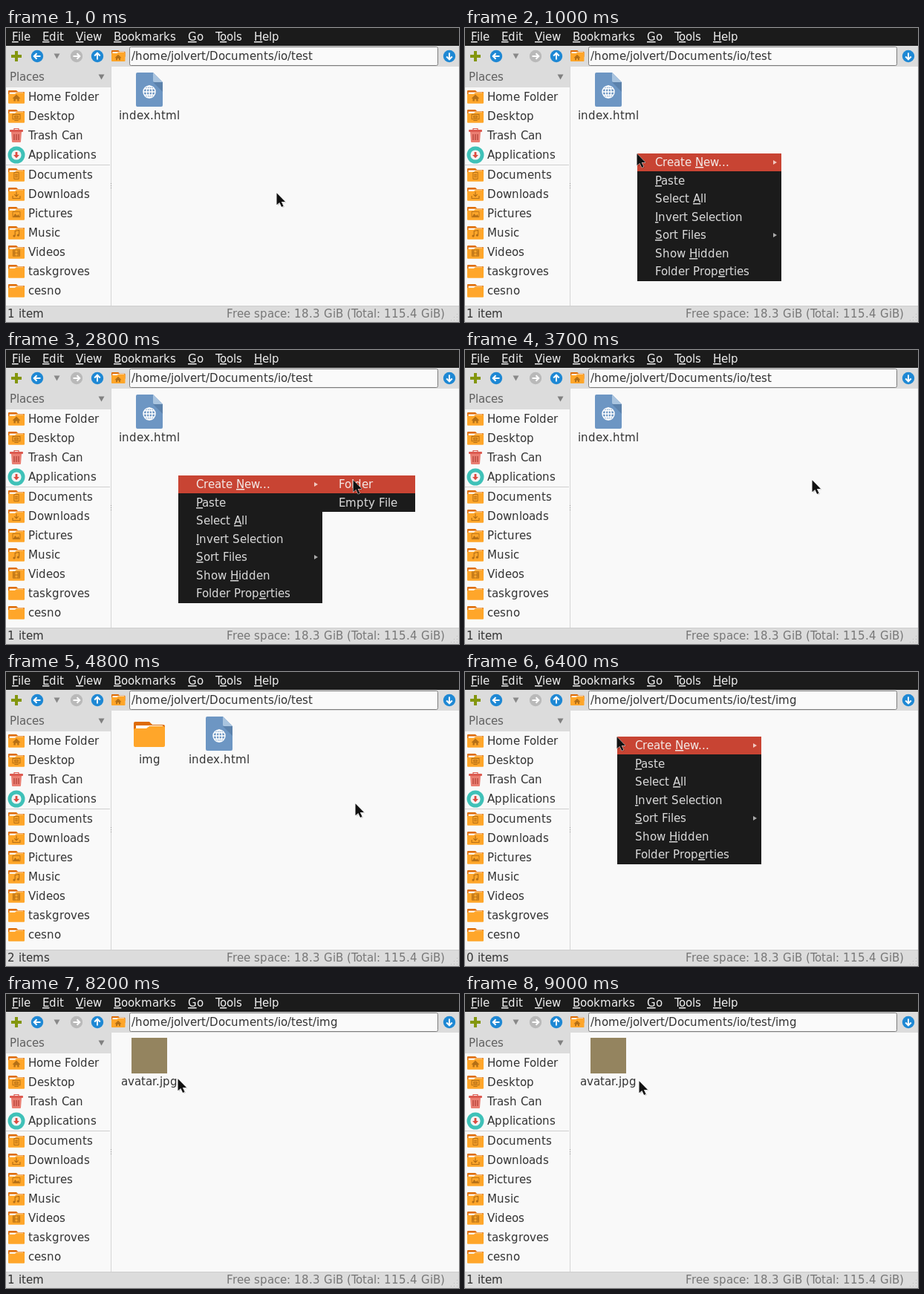
An HTML page for the animation above (9200 ms loop, 610 px wide and 396 px high).

```html
<!DOCTYPE html>
<html lang="en">
<head>
<meta charset="utf-8">
<title>File manager</title>
<style>
html, body { margin: 0; width: 100%; height: 100%; overflow: hidden; background: #f9f9f9; }
svg { display: block; font: 15px "DejaVu Sans", sans-serif; fill: #333; }
text { white-space: pre; }
.u { text-decoration: underline; }
</style>
</head>
<body>
<svg id="stage" width="610" height="396" viewBox="0 0 610 396"></svg>
<script>
const LOOP = 9200, STEP = 100, ROW = 24.57;
const stage = document.getElementById('stage');
const ruler = document.createElement('canvas').getContext('2d');
ruler.font = '15px "DejaVu Sans", sans-serif';

// ---- markup helpers ----
const rect = (x, y, w, h, fill, more = '') =>
  `<rect x="${x}" y="${y}" width="${w}" height="${h}" fill="${fill}" ${more}/>`;
const path = (d, fill, more = '') => `<path d="${d}" fill="${fill}" ${more}/>`;
const line = (d, color, w = 1) =>
  path(d, 'none', `stroke="${color}" stroke-width="${w}"`);
const disc = (x, y, r, fill, more = '') =>
  `<circle cx="${x}" cy="${y}" r="${r}" fill="${fill}" ${more}/>`;
const group = (x, y, body, more = '', s = 1) =>
  `<g transform="translate(${x} ${y}) scale(${s})" ${more}>${body}</g>`;

// Glyph offsets on the whole-pixel grid, as a hinted desktop toolkit sets them.
const width = s => ruler.measureText(s).width;
function offsets(s) {
  const at = [0];
  [...s].forEach((c, i) => {
    const next = s[i + 1] || '';
    const kern = width(c + next) - width(c) - width(next);
    at.push(at[i] + Math.round(width(c)) + Math.round(kern));
  });
  return at;
}

// An underscore marks the mnemonic letter.
function label(x, y, s, fill = '#333', centered = false) {
  const at = offsets(s.replace('_', '')), total = at.pop();
  const left = centered ? Math.round(x - total / 2) : x;
  return `<text x="${at.map(d => left + d).join(' ')}" y="${y}" fill="${fill}">` +
    s.replace(/_(.)/, '<tspan class="u">$1</tspan>') + '</text>';
}

// ---- icons ----
const folder = (x, y, s = 1) => group(x, y,
  path('M0 2Q0 0 2 0H21L25 4H40Q42 4 42 6V20H0Z', '#de6c05') +
  rect(3, 5, 36, 8, '#fff') +
  path('M0 11Q0 9 2 9H17L21 6H40Q42 6 42 8V32Q42 34 40 34H2Q0 34 0 32Z', '#ffa62a'), '', s);

const arrowDisc = (x, angle, fill) => group(x, 38,
  disc(0, 0, 8.2, fill) +
  `<g transform="rotate(${angle})">${line('M-4.5 0H4M0.5 -3.8L4.3 0L0.5 3.8', '#fff', 2)}</g>`);

const page = group(175, 60,
  path('M2 0H23L36 13V44Q36 46 34 46H2Q0 46 0 44V2Q0 0 2 0Z', '#6d96c3') +
  path('M23 13H36V26Z', '#5c82ac') +
  path('M23 0L36 13H25Q23 13 23 11Z', '#a9c4df') +
  group(18, 26, disc(0, 0, 8, 'none') +
    '<ellipse rx="3.8" ry="8"/><path d="M0 -8V8M-8 0H8M-6.8 -4.2H6.8M-6.8 4.2H6.8"/>',
    'fill="none" stroke="#fff" stroke-width="1.4"'));

const INK = '#b46f16';
const glyphs = {
  home: path('M0 -5L6 1H4V5H1.3V2H-1.3V5H-4V1H-6Z', INK),
  screen: line('M-5.5 -4H5.5V3H-5.5ZM-3 5H3M-2.5 -1.5H2.5V1H-2.5Z', INK, 1.2),
  doc: line('M-3.5 -5H3.5V5H-3.5ZM-2 -2H2M-2 0H2M-2 2H2', INK, 1.1),
  down: line('M0 -5V2M-3 -1L0 2L3 -1M-5.5 1V5H5.5V1', INK, 1.3),
  photo: line('M-5.5 -4H5.5V4H-5.5Z', INK) + path('M-5 4L-2 -1L1 2L3 0L5 4Z', INK),
  note: line('M-2 3V-4L4 -5V2', INK, 1.3) + disc(-3.3, 3.4, 1.8, INK) + disc(2.7, 2.4, 1.8, INK),
  film: line('M-5 -5V5M5 -5V5M-2.5 -5V5M2.5 -5V5M-5 -4.5H5M-5 0H5M-5 4.5H5M-5 -2H-2M-5 2H-2M2 -2H5M2 2H5', INK, 1.1)
};

const trash = group(14, 145,
  path('M-7 -5H7L6 8Q6 9 5 9H-5Q-6 9 -6 8Z', '#ea7e72') +
  line('M-3 -2V6M0 -2V6M3 -2V6', '#b9483e', 1.4) +
  rect(-9, -8, 18, 3, '#dc5a50', 'rx="1"') + line('M-3 -8V-9.5H3V-8', '#dc5a50', 1.2));

const apps = group(14, 171,
  disc(0, 0, 11.5, '#3fc1b8') + disc(0, 0, 6.6, '#f4f4f4') +
  path('M-1.4 -4H1.4V0H4L0 4.2L-4 0H-1.4Z', '#dc4b40'));

// ---- window ----
const places = [
  ['Home Folder', 'home'], ['Desktop', 'screen'], ['Trash Can'], ['Applications'],
  ['Documents', 'doc'], ['Downloads', 'down'], ['Pictures', 'photo'], ['Music', 'note'],
  ['Videos', 'film'], ['taskgroves', ''], ['cesno', '']
];
const sidebar = places.map(([name, icon], i) => {
  const y = 98 + 26 * i + (i > 3);
  const mark = icon === undefined ? '' :
    folder(3, y - 14, .524) + (icon ? group(14, y - 4, glyphs[icon], '', .9) : '');
  return mark + label(30, y, name);
}).join('');

const menubar = [[8, '_File'], [49, '_Edit'], [94, '_View'], [145, '_Bookmarks'],
  [245, '_Go'], [282, 'T_ools'], [334, '_Help']]
  .map(([x, s]) => label(x, 17, s, '#eee')).join('');

const grip = [[607, 385], [607, 389], [607, 393], [603, 389], [603, 393], [599, 393]]
  .map(([x, y]) => rect(x, y, 1, 1, '#bbb')).join('');

const chrome =
  rect(0, 0, 610, 396, '#f9f9f9') + rect(0, 0, 610, 24, '#1b1b1b') + menubar +
  rect(0, 24, 610, 28, '#dcdcdc') + rect(0, 52, 141, 28, '#dcdcdc') +
  rect(141, 52, 1, 323, '#d6d6d6') +
  path('M12 31H16V36H21V40H16V45H12V40H7V36H12Z', '#83960e') +
  arrowDisc(42, 180, '#1e88d4') + path('M64.5 34.5H72.5L68.5 41.5Z', '#888') +
  arrowDisc(95, 0, '#b9b9b9') + arrowDisc(123, -90, '#1e88d4') +
  folder(142, 30, .44) + group(151, 39.5, glyphs.home, '', .75) +
  rect(166.5, 25.5, 415, 25, '#fafafa', 'rx="2" stroke="#7c7c7c"') +
  arrowDisc(597, 90, '#1e88d4') +
  label(5, 71, 'Places', '#606060') + path('M124.5 62.5H132.5L128.5 69.5Z', '#808080') +
  trash + apps + sidebar + rect(0, 184, 140, 1, '#cfcfcf') +
  [209, 212, 215].map(y => rect(141, y, 1, 1, '#999')).join('') +
  rect(0, 374, 610, 1, '#cdcdcd') + rect(0, 375, 610, 21, '#dcdcdc') +
  label(297, 390, 'Free space: 18.3 GiB (Total: 115.4 GiB)', '#777') + grip;

// ---- menus ----
const mainItems = ['Create _New...', '_Paste', 'Select _All', '_Invert Selection',
  '_Sort Files', 'Show _Hidden', 'Folder Prop_erties'];
const subItems = ['Folder', 'Empty File'];

function menu(x, y, w, items, hot) {
  const rows = items.map((s, i) => {
    const top = Math.ceil(y + ROW * i), base = Math.round(y + 17 + ROW * i);
    const bar = i === hot ? rect(x, top, w, 24, '#c84433') : '';
    const more = /Create|Sort/.test(s)
      ? path(`M${x + 183} ${base - 8}l5 3l-5 3Z`, i === hot ? '#f0c8c0' : '#aaa') : '';
    return bar + label(x + (w > 150 ? 24 : 22), base, s, i === hot ? '#f3e9e6' : '#dadada') + more;
  });
  return rect(x, y, w, Math.round(ROW * items.length), '#1b1b1b') + rows.join('');
}

// ---- timeline ----
const track = [ // time, x, y of the pointer
  [0, 365, 222], [200, 365, 222], [800, 232, 169], [1000, 232, 169], [1600, 306, 221],
  [1900, 330, 182], [2300, 405, 180], [2700, 468, 175], [3900, 468, 175], [4300, 471, 177],
  [4900, 471, 177], [5600, 197, 88], [5800, 197, 88], [6100, 205, 87], [6400, 205, 87],
  [6900, 232, 114], [8300, 232, 114], [8900, 235, 117], [LOOP, 235, 117]
];
function pointer(t) {
  const i = track.findIndex(k => k[0] > t);
  const [t0, x0, y0] = track[i - 1], [t1, x1, y1] = track[i];
  const p = (t - t0) / (t1 - t0), e = p * p * (3 - 2 * p);
  return [Math.round(x0 + (x1 - x0) * e), Math.round(y0 + (y1 - y0) * e)];
}

const named = (x, s) => label(x, 123, s, '#333', true);
const indexFile = x => group(x - 193, 0, page) + named(x, 'index.html');
const imgFolder = folder(172, 67) + named(193, 'img');
const picture = rect(169, 59, 48, 48, '#94845f') + named(193, 'avatar.jpg');
const outline = 'M0 0V16L3.8 12.6L6.6 18.6L9 17.5L6.3 11.7H11.5Z';
const arrow = group(1, 1.5, path(outline, '#000', 'opacity=".18"')) +
  group(-.5, .3, path(outline, '#111', 'stroke="#fff" stroke-linejoin="round" paint-order="stroke"'));

function contents(t) {
  if (t < 3900) return [indexFile(193), '1 item'];
  if (t < 5900) return [imgFolder + indexFile(287), '2 items'];
  return t < 7400 ? ['', '0 items'] : [picture, '1 item'];
}

function menus(t, x, y) {
  const first = t >= 900 && t < 2900, second = t >= 6100 && t < 7100;
  if (!first && !second) return '';
  const [mx, my] = first ? [232, 169] : [205, 87];
  const hot = x >= 426 ? 0 : Math.floor((y - my) / ROW);
  const sub = first && t >= 2000 ? menu(426, 169, 125, subItems, x >= 426 ? 0 : -1) : '';
  return menu(mx, my, 194, mainItems, hot) + sub;
}

stage.innerHTML = chrome + '<g id="live"></g>';
const live = document.getElementById('live');
const start = performance.now();
let shown = -1;

function draw() {
  const t = Math.floor((performance.now() - start) % LOOP / STEP) * STEP;
  if (t !== shown) {
    shown = t;
    const [x, y] = pointer(t), [files, count] = contents(t);
    live.innerHTML = files + label(2, 390, count) +
      label(169, 43, '/home/jolvert/Documents/io/test' + (t < 5900 ? '' : '/img')) +
      menus(t, x, y) + group(x, y, arrow);
  }
  requestAnimationFrame(draw);
}
draw();
</script>
</body>
</html>
```
